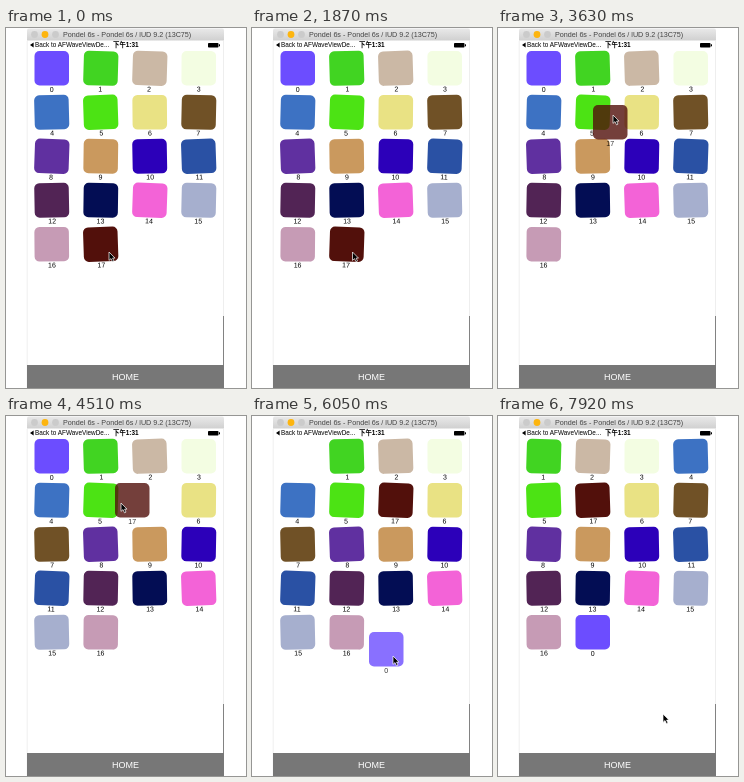
These frames come from a looping animation (240 px wide and 360 px high, 8000 ms). An HTML page:

```html
<!DOCTYPE html>
<html lang="en">
<head>
<meta charset="utf-8">
<title>Wobbling grid</title>
<style>
  html, body { margin: 0; width: 100%; height: 100%; overflow: hidden; background: #fff; }
  svg { display: block; width: 100vw; height: 100vh; }
  text { font-family: "Liberation Sans", Arial, "Noto Sans CJK SC", "Noto Sans CJK", sans-serif; }
  .label { font-size: 7px; text-anchor: middle; }
</style>
</head>
<body>
<svg viewBox="0 0 240 360">
  <defs>
    <linearGradient id="bar" x2="0" y2="1">
      <stop stop-color="#e9e9e9"/>
      <stop offset="1" stop-color="#d0d0d0"/>
    </linearGradient>
  </defs>
  <rect width="240" height="360" fill="#fff"/>
  <path d="M21.2 13V360M217.5 13V360" stroke="#ddd" stroke-width=".5"/>
  <path d="M217.5 288V337" stroke="#666" stroke-width=".8"/>
  <path d="M21 12.5V2.5Q21 .5 23 .5H216Q218 .5 218 2.5V12.5Z" fill="url(#bar)"/>
  <circle cx="28.5" cy="6.5" r="3.4" fill="#cbcbcb"/>
  <circle cx="39" cy="6.5" r="3.4" fill="#fdb50f"/>
  <circle cx="49.5" cy="6.5" r="3.4" fill="#cbcbcb"/>
  <text x="57" y="9.2" font-size="7.2" fill="#444">Pondel 6s - Pondel 6s / lUD 9.2 (13C75)</text>
  <path d="M24 17L27.6 14.4V19.6Z"/>
  <text x="29" y="19.4" font-size="6.4">Back to AFWaveViewDe...</text>
  <text x="107" y="19.4" font-size="6.4" font-weight="bold">下午1:31</text>
  <rect x="202" y="15" width="10.5" height="4.5" rx=".8"/>
  <rect x="213" y="16.3" width="1" height="2"/>
  <rect x="21" y="337" width="197" height="23" fill="#777"/>
  <text x="119.5" y="352.3" font-size="9" fill="#fff" text-anchor="middle">HOME</text>
  <g id="cells"></g>
  <path id="cursor" d="M0 0V8.4L2 6.6L3.5 9.8L5 9.1L3.6 6.1H6Z" fill="#000" stroke="#fff" stroke-width=".7"/>
</svg>
<script>
const LOOP = 8000, STEP = 110, SIZE = 34.5;
const COLORS = ['#6c4dff', '#41d422', '#cbb8a5', '#f3fde2', '#3d72c3', '#4ce314',
  '#e9e284', '#705126', '#6030a0', '#ca995e', '#2c00b9', '#2a51a4',
  '#522455', '#030d54', '#f363d7', '#a6afce', '#c69bb5', '#52100b'];

const slot = i => [28.5 + 49 * (i % 4), 23 + 44 * Math.floor(i / 4)];

function move(order, from, to) {
  const next = order.slice();
  next.splice(to, 0, next.splice(from, 1)[0]);
  return next;
}
const first = COLORS.map((_, i) => i);
const second = move(first, 17, 6);
const third = move(second, 0, 17);

// Each key is [time, x, y]
const DRAGS = {
  17: {
    held: [2600, 4650],
    keys: [[2700, ...slot(17)], [3400, 95, 77], [3740, 95, 77], [4400, 109, 67],
      [4520, 109, 67], [4740, ...slot(6)], [6160, ...slot(6)], [6450, ...slot(5)]]
  },
  0: {
    held: [5280, 7000],
    keys: [[5390, ...slot(0)], [5950, 117, 216], [6060, 117, 216], [6490, 144, 280],
      [6820, 144, 280], [7100, ...slot(17)]]
  }
};
const POINTER = [[0, 103, 224], [1500, 100.5, 224], [2700, 100.5, 224], [3400, 115, 87],
  [4620, 115, 87], [5200, 52.5, 48], [5390, 52.5, 48], [5950, 141, 240],
  [6060, 141, 240], [6490, 165, 298]];

function track(keys, t) {
  const n = keys.findIndex(k => k[0] > t);
  if (n === 0) return keys[0].slice(1);
  if (n < 0) return keys[keys.length - 1].slice(1);
  const [t0, x0, y0] = keys[n - 1], [t1, x1, y1] = keys[n];
  const p = (t - t0) / (t1 - t0), e = p * p * (3 - 2 * p);
  return [x0 + (x1 - x0) * e, y0 + (y1 - y0) * e];
}

function make(tag, attrs, parent) {
  const el = document.createElementNS('http://www.w3.org/2000/svg', tag);
  for (const k in attrs) el.setAttribute(k, attrs[k]);
  return parent.appendChild(el);
}

const layer = document.getElementById('cells');
const cursor = document.getElementById('cursor');
const cells = COLORS.map((fill, id) => {
  const el = make('g', {}, layer);
  make('rect', { width: SIZE, height: SIZE, rx: 5, fill }, el);
  make('text', { x: SIZE / 2, y: 40.5, class: 'label' }, el).textContent = id;
  const a = slot(id), b = slot(second.indexOf(id)), c = slot(third.indexOf(id));
  const drag = DRAGS[id];
  return {
    el,
    held: drag ? drag.held : [0, 0],
    keys: drag ? drag.keys : [[3740, ...a], [4030, ...b], [6160, ...b], [6450, ...c]]
  };
});
layer.append(cells[17].el, cells[0].el);

// Each cell swings with its own phase
const tilt = (id, t) => 2 * Math.sin(id + Math.PI * t / STEP);

function draw(now) {
  const t = Math.floor(now % LOOP / STEP) * STEP;
  cells.forEach(({ el, held, keys }, id) => {
    const up = t >= held[0] && t < held[1];
    const [x, y] = track(keys, t);
    el.setAttribute('transform', `translate(${x} ${y}) rotate(${up ? 0 : tilt(id, t)} 17 19)`);
    el.setAttribute('opacity', up ? 0.8 : 1);
  });
  cursor.setAttribute('transform', `translate(${track(POINTER, t)})`);
}

const start = performance.now();
function tick() {
  draw(performance.now() - start);
  requestAnimationFrame(tick);
}
tick();
</script>
</body>
</html>
```
